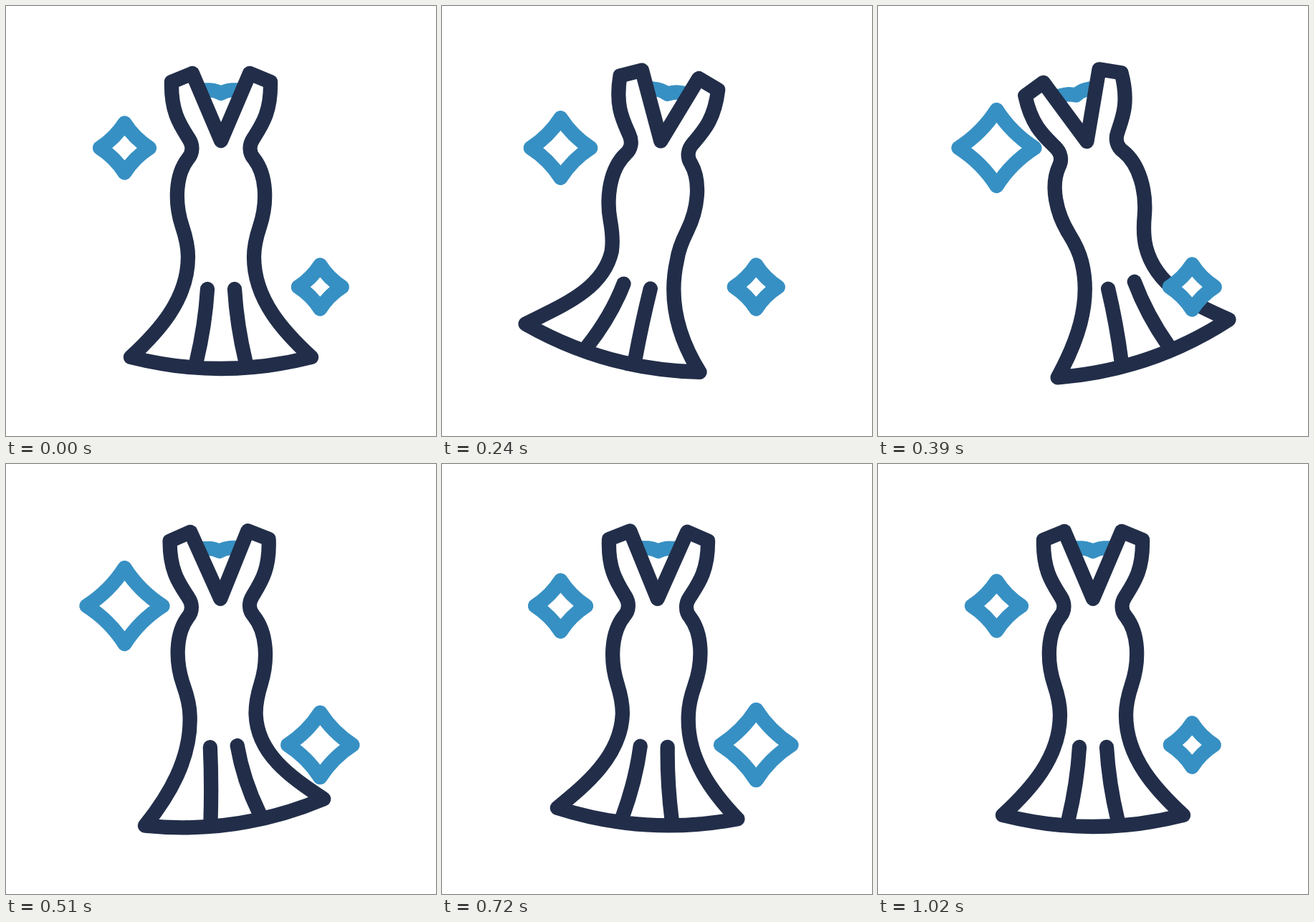
These frames come from a looping animation (600 by 600 pixels, 1200 ms). An HTML page:

```html
<!DOCTYPE html>
<html lang="en">
<head>
<meta charset="utf-8">
<title>Dress</title>
<style>
  html, body { margin: 0; width: 100%; height: 100%; overflow: hidden; background: #fff; }
  svg { display: block; width: 100vw; height: 100vh; }
  path { fill: none; stroke: #222e49; stroke-width: 20.3; stroke-linecap: round; stroke-linejoin: round; }
  .blue { stroke: #3790c3; }
  .sparkle { fill: #fff; }
</style>
</head>
<body>
<svg viewBox="0 0 600 600">
  <g id="dress">
    <path class="blue" stroke-width="22" d="M275 117.500H286Q293 118 300 121.700Q307 118 314 117.500H325"/>
    <path id="body"/>
  </g>
  <path id="left" class="blue sparkle" transform="translate(165.500 198)"/>
  <path id="right" class="blue sparkle" transform="translate(438.300 392)"/>
</svg>
<script>
const LOOP = 1200, STEP = 30;
const el = id => document.getElementById(id);

// Left half of the dress: strap, side and slit
const HALF = 'M300 188 L260 94 L231 106 C230 148 243 166 255 185 C261 194 261 205 254 213 ' +
  'C236 236 235 275 246 308 C253 329 254 340 254 350 C254 410 212 455 174 490 ' +
  'M281 395 Q278 445 265.5 497 ';
const HEM = 'M174 490 Q300 522 426 490';

const mapPoints = (path, fn) =>
  path.replace(/([\d.]+) ([\d.]+)/g, (_, x, y) => fn(+x, +y).map(n => n.toFixed(2)).join(' '));
const DRESS = HALF + mapPoints(HALF, (x, y) => [600 - x, y]) + HEM;

// Keys are [time, value], eased in and out between neighbours
const TILT = [[30, 0], [220, 9], [390, -13.4], [570, 3.1], [810, 0]];
const SWING = [[90, 0], [270, 7.9], [450, -9.9], [660, 3], [900, 0]];
const LEFT = [[150, 34.5], [360, 53], [510, 53], [755, 34.5]];
const RIGHT = [[360, 30.5], [575, 49.3], [705, 49.3], [1020, 30.5]];

function valueAt(keys, t) {
  const i = keys.findIndex(k => k[0] > t);
  if (i < 0) return keys[keys.length - 1][1];
  if (i === 0) return keys[0][1];
  const [t0, a] = keys[i - 1], [t1, b] = keys[i];
  const u = (t - t0) / (t1 - t0);
  return a + (b - a) * u * u * (3 - 2 * u);
}

// How strongly a point at this height follows the hem
const looseness = y => y < 360 ? 0 : y < 430 ? 0.3 : y < 452 ? 0.6 : 1;

function bend(deg) {
  const rad = deg * Math.PI / 180, c = Math.cos(rad), s = Math.sin(rad);
  const dx = -deg * (deg > 0 ? 3.5 : 1.8), dy = -Math.abs(deg) * (deg > 0 ? 0.9 : 0.5);
  return mapPoints(DRESS, (x, y) => {
    const w = looseness(y), px = x - 300, py = y - 490;
    return [x + w * (px * c - py * s - px + dx), y + w * (px * s + py * c - py + dy)];
  });
}

function sparkle(r) {
  const c = r * 0.39;
  return `M0 ${-r}Q${c} ${-c} ${r} 0Q${c} ${c} 0 ${r}Q${-c} ${c} ${-r} 0Q${-c} ${-c} 0 ${-r}Z`;
}

function draw(t) {
  el('dress').setAttribute('transform', `rotate(${valueAt(TILT, t)} 300 225)`);
  el('body').setAttribute('d', bend(valueAt(SWING, t)));
  el('left').setAttribute('d', sparkle(valueAt(LEFT, t)));
  el('right').setAttribute('d', sparkle(valueAt(RIGHT, t)));
}

const start = performance.now();
function tick() {
  const t = (performance.now() - start) % LOOP;
  draw(Math.floor(t / STEP) * STEP);
  requestAnimationFrame(tick);
}
tick();
</script>
</body>
</html>
```
